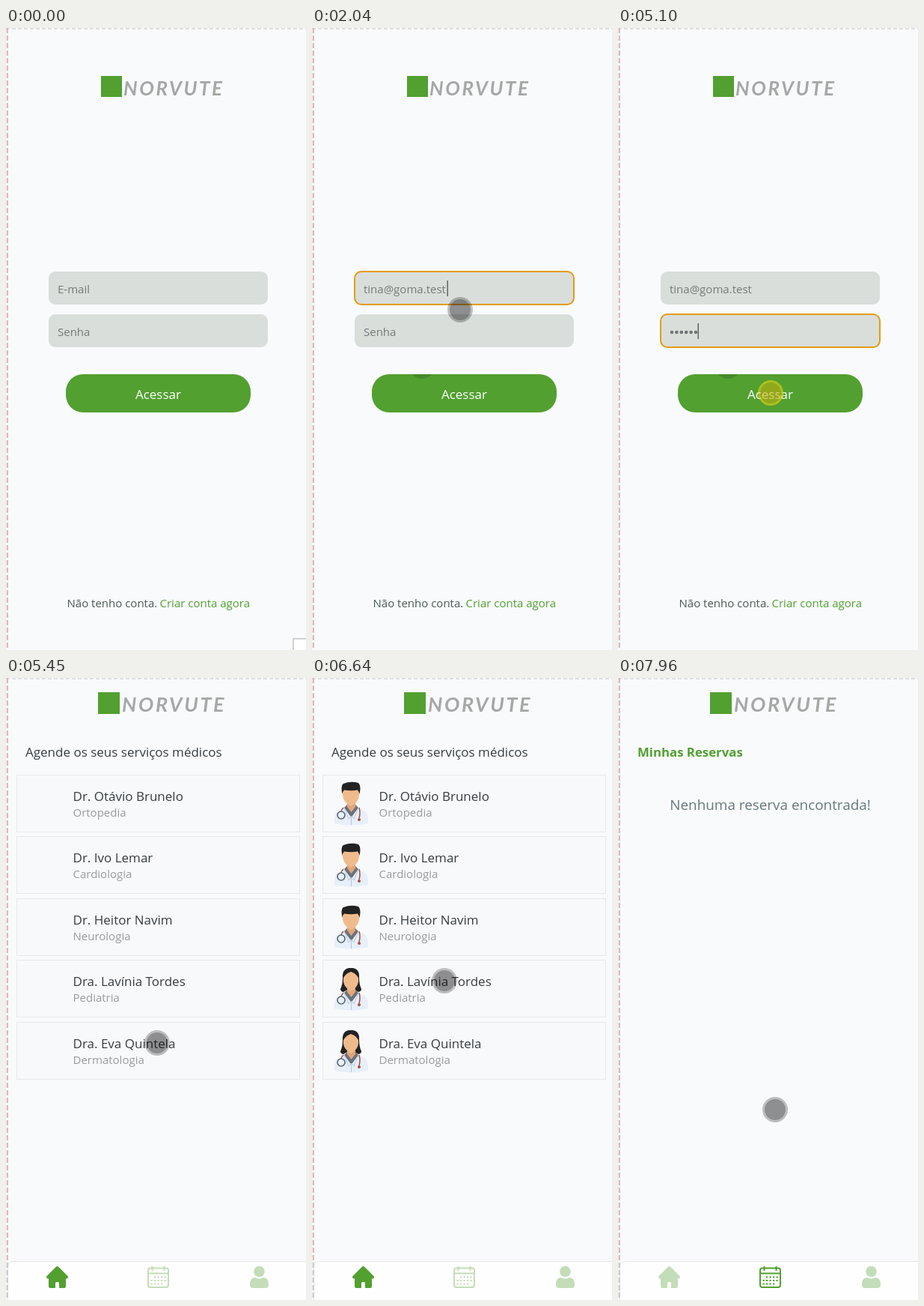
Animation, 401 px wide and 830 px high, one loop 8 s. Source, as an HTML page:

```html
<!DOCTYPE html>
<html lang="pt">
<head>
<meta charset="utf-8">
<title>Agendamento</title>
<style>
html, body { margin: 0; width: 100%; height: 100%; overflow: hidden; background: #f8fafc; }
svg { display: block; width: 401px; height: 830px; font: 15px "Open Sans", "Noto Sans", sans-serif; }
svg * { animation-duration: 8s; animation-iteration-count: infinite; animation-timing-function: step-end; }

.brand { font: italic 700 26px Lato, sans-serif; letter-spacing: 2.6px; fill: #a6a8a6; }
.green { fill: #52a030; }
.field { fill: #d9dedb; }
.hint { fill: #747b79; }
.ring { fill: none; stroke: #e39c0c; stroke-width: 2; }
.caret { fill: #5d6664; }
.big { font-size: 17px; fill: #363d41; }
.soft { fill: #989c9d; }
.card { fill: #f8f9fb; stroke: #e7e9eb; }
.mid { text-anchor: middle; }

/* screens */
.login { animation-name: login; }
.app { animation-name: app; }
.list { animation-name: list; }
.bookings { animation-name: bookings; }
.empty { animation-name: empty; }
.photo { animation-name: photo; }
.badge { animation-name: badge; }
@keyframes login { 0% { opacity: 1 } 68.125%, 100% { opacity: 0 } }
@keyframes app { 0% { opacity: 0 } 68.125%, 100% { opacity: 1 } }
@keyframes list { 0% { opacity: 1 } 93.25%, 100% { opacity: 0 } }
@keyframes bookings { 0% { opacity: 0 } 93.25%, 100% { opacity: 1 } }
@keyframes empty { 0% { opacity: 0 } 93.875%, 100% { opacity: 1 } }
@keyframes photo { 0% { opacity: 0 } 68.75%, 100% { opacity: 1 } }
@keyframes badge { 0% { opacity: 1 } .625%, 100% { opacity: 0 } }

/* form */
.ring1 { animation-name: ring1; }
.ring2 { animation-name: ring2; }
.hint1 { animation-name: hint1; }
.mail { animation-name: mail; }
.hint2 { animation-name: hint2; }
.caret1 { animation-name: caret1; }
.caret2 { animation-name: blink2; }
.typed { animation-name: type; }
.dots { animation-name: dots; stroke: #6e7573; stroke-width: 4.6; stroke-linecap: round; stroke-dasharray: 0 6.4; }
.smudge { animation-name: smudge; }
.button { animation-name: press-button; animation-timing-function: ease-out; }
@keyframes ring1 { 0% { opacity: 0 } 13.375% { opacity: 1 } 30.5%, 100% { opacity: 0 } }
@keyframes ring2 { 0% { opacity: 0 } 30.5% { opacity: 1 } 65.625%, 100% { opacity: 0 } }
@keyframes hint1 { 0% { opacity: 1 } 24.375%, 100% { opacity: 0 } }
@keyframes mail { 0% { opacity: 0 } 24.375%, 100% { opacity: 1 } }
@keyframes hint2 { 0% { opacity: 1 } 40.75%, 100% { opacity: 0 } }
@keyframes dots { 0% { opacity: 0 } 40.75%, 100% { opacity: 1 } }
@keyframes smudge { 0% { opacity: 0 } 8.75%, 100% { opacity: .13 } }
@keyframes caret1 {
  0% { opacity: 0; transform: none }
  13.375% { opacity: 1; transform: none }
  19.625% { opacity: 0; transform: none }
  24.375% { opacity: 1; transform: translateX(112px) }
  30.5%, 100% { opacity: 0; transform: none }
}
@keyframes blink2 {
  0% { opacity: 0 }
  30.5% { opacity: 1 } 37.375% { opacity: 0 }
  40.75% { opacity: 1 } 56% { opacity: 0 }
  62.25% { opacity: 1 } 65.625%, 100% { opacity: 0 }
}
@keyframes type {
  0% { transform: none }
  40.75% { transform: translateX(6px) }
  43.25% { transform: translateX(12.4px) }
  44.5% { transform: translateX(18.8px) }
  46.375% { transform: translateX(25.2px) }
  48.25% { transform: translateX(31.6px) }
  49.75%, 100% { transform: translateX(38px) }
}
@keyframes press-button { 0%, 64.4% { opacity: 1 } 66%, 66.6% { opacity: .7 } 68%, 100% { opacity: 1 } }

/* tab bar */
.tab-home { animation-name: tab-off; }
.tab-cal { animation-name: tab-on; }
.tab-user { color: #c3ddb8; }
.tab { fill: currentColor; }
@keyframes tab-off { 0% { color: #52a030 } 93.25%, 100% { color: #c3ddb8 } }
@keyframes tab-on { 0% { color: #c3ddb8 } 93.25%, 100% { color: #52a030 } }

/* pointer */
.pointer { animation-name: move; animation-timing-function: linear; }
.idle { animation-name: idle; }
.down { animation-name: down; }
@keyframes move {
  0%, 4.75% { transform: translate(182px, 850px) }
  8.5% { transform: translate(147px, 451px); animation-timing-function: ease-out }
  12.5%, 22.5% { transform: translate(128px, 336px) }
  25.5%, 26.2% { transform: translate(198px, 376px); animation-timing-function: ease-in-out }
  29.5% { transform: translate(157px, 405px) }
  57.5% { transform: translate(157px, 405px); animation-timing-function: ease-in-out }
  62.5%, 67.5% { transform: translate(204px, 487px) }
  68.125% { transform: translate(202px, 487px) }
  72% { transform: translate(202px, 487px); animation-timing-function: ease-in-out }
  77.5% { transform: translate(187px, 780px); animation-timing-function: ease-in }
  82.375% { transform: translate(177px, 473px) }
  83% { transform: translate(177px, 405px); animation-timing-function: ease-out }
  84.5% { transform: translate(175px, 335px); animation-timing-function: ease-in }
  88% { transform: translate(214px, 600px); animation-timing-function: ease-out }
  91% { transform: translate(209px, 813px) }
  97.75% { transform: translate(209px, 813px) }
  99.5%, 100% { transform: translate(210px, 576px) }
}
@keyframes idle {
  0% { opacity: 1 }
  13.375% { opacity: 0 } 15.875% { opacity: 1 }
  29.875% { opacity: 0 } 31.125% { opacity: 1 }
  63.125% { opacity: 0 } 65% { opacity: 1 }
  92% { opacity: 0 } 94.5%, 100% { opacity: 1 }
}
@keyframes down {
  0% { opacity: 0 }
  13.375% { opacity: 1 } 15.875% { opacity: 0 }
  29.875% { opacity: 1 } 31.125% { opacity: 0 }
  63.125% { opacity: 1 } 65% { opacity: 0 }
  92% { opacity: 1 } 94.5%, 100% { opacity: 0 }
}
</style>
</head>
<body>
<svg viewBox="0 0 401 830">
  <defs>
    <g id="coat">
      <path d="M30 64V58Q30 48 39 45L46 42H59L66 45Q75 48 75 58V64Q53 69 30 64Z" fill="#e7effa"/>
      <path d="M43 43L52.5 56L62 43L58 39H47Z" fill="#68727f"/>
      <path d="M47 34H58V42L52.5 49L47 42Z" fill="#e3a577"/>
      <path d="M43 43L49 58L52.5 54M62 43L56 58L52.5 54V66" fill="none" stroke="#b9c6d8"/>
      <path d="M42 43Q39 46 39 48M63 43Q65 50 63 57" fill="none" stroke="#a4503f" stroke-width="1.5"/>
      <circle cx="39" cy="53" r="5" fill="none" stroke="#59636f" stroke-width="1.6"/>
      <circle cx="63" cy="59" r="2" fill="#a4503f"/>
    </g>
    <g id="man">
      <use href="#coat"/>
      <path d="M41 20Q41 15 52 15Q63 15 63 20V27Q62 36 52 41Q42 36 41 27Z" fill="#f0bb8c"/>
      <path d="M40.500 25Q38 14 42 11Q52 7 62 10Q66 14 63.500 25Q62.500 21 61 19.500Q52 21 43 19.500Q41 21 40.500 25Z" fill="#232222"/>
    </g>
    <g id="woman">
      <path d="M41 23Q40 10 52 10Q64 10 63 23Q63 32 66 38Q66 41 62 42L52 36L42 42Q38 41 38 38Q41 32 41 23Z" fill="#232222"/>
      <use href="#coat"/>
      <path d="M42 22Q42 14 52 14Q62 14 62 22V28Q61 36 52 41Q43 36 42 28Z" fill="#f0bb8c"/>
      <path d="M41 26Q40 10 52 10Q64 10 63 26Q61 18 52 15Q43 18 41 26Z" fill="#232222"/>
    </g>
    <rect id="card" class="card" x="14.5" y="-.5" width="378" height="76"/>
  </defs>

  <g class="login">
    <rect class="green" x="127" y="64" width="28" height="28"/>
    <text class="brand" x="157" y="90">NORVUTE</text>

    <rect class="field" x="57" y="325" width="293" height="44" rx="9"/>
    <text class="hint hint1" x="69" y="354">E-mail</text>
    <text class="hint mail" x="69" y="354">tina@goma.test</text>
    <rect class="caret caret1" x="68.5" y="337" width="1.5" height="21"/>
    <rect class="ring ring1" x="57" y="325" width="293" height="44" rx="9"/>

    <rect class="field" x="57" y="382" width="293" height="44" rx="9"/>
    <path class="dots" d="M72 406H105"/>
    <g class="typed">
      <rect class="field" x="69" y="394" width="45" height="21"/>
      <rect class="caret caret2" x="68.5" y="394" width="1.5" height="21"/>
    </g>
    <text class="hint hint2" x="69" y="411">Senha</text>
    <rect class="ring ring2" x="57" y="382" width="293" height="44" rx="9"/>

    <g class="button">
      <rect class="green" x="80" y="462" width="247" height="51" rx="23"/>
      <path class="smudge" d="M133 462H161Q147 474 133 462Z"/>
      <text class="mid" x="203.5" y="495" font-size="17" fill="#fff">Acessar</text>
    </g>

    <text x="81.5" y="773" fill="#4c5a52">Não tenho conta.</text>
    <text class="green" x="205.5" y="773">Criar conta agora</text>
    <rect class="badge" x="384" y="815" width="30" height="30" fill="#fff" stroke="#cfd2d4" stroke-width="2"/>
  </g>

  <g class="app">
    <rect class="green" x="123" y="19" width="29" height="29"/>
    <text class="brand" x="155" y="45" style="font-size: 27px">NORVUTE</text>

    <g class="list">
      <text class="big" x="26" y="105">Agende os seus serviços médicos</text>
      <g transform="translate(0 130)">
        <use href="#card"/><use class="photo" href="#man"/>
        <text class="big" x="89.5" y="34">Dr. Otávio Brunelo</text><text class="soft" x="89.5" y="55">Ortopedia</text>
      </g>
      <g transform="translate(0 212)">
        <use href="#card"/><use class="photo" href="#man"/>
        <text class="big" x="89.5" y="34">Dr. Ivo Lemar</text><text class="soft" x="89.5" y="55">Cardiologia</text>
      </g>
      <g transform="translate(0 295)">
        <use href="#card"/><use class="photo" href="#man"/>
        <text class="big" x="89.5" y="34">Dr. Heitor Navim</text><text class="soft" x="89.5" y="55">Neurologia</text>
      </g>
      <g transform="translate(0 377)">
        <use href="#card"/><use class="photo" href="#woman"/>
        <text class="big" x="89.5" y="34">Dra. Lavínia Tordes</text><text class="soft" x="89.5" y="55">Pediatria</text>
      </g>
      <g transform="translate(0 460)">
        <use href="#card"/><use class="photo" href="#woman"/>
        <text class="big" x="89.5" y="34">Dra. Eva Quintela</text><text class="soft" x="89.5" y="55">Dermatologia</text>
      </g>
    </g>

    <g class="bookings">
      <text class="green" x="26" y="105" font-size="16.8" font-weight="700">Minhas Reservas</text>
      <text class="mid empty" x="203.5" y="176" font-size="18.9" fill="#66787d">Nenhuma reserva encontrada!</text>
    </g>

    <rect x="2.5" y="778.5" width="410" height="70" rx="7" fill="#fefefe" stroke="#e3e6e5"/>
    <g class="tab-home">
      <path class="tab" d="M56 799.5L68.5 787L81 799.5H78V812H72V805H65V812H59V799.5Z" stroke="currentColor" stroke-width="4" stroke-linejoin="round"/>
      <path d="M66 814V807.5Q66 806 67.5 806H69.5Q71 806 71 807.5V814Z" fill="#fefefe"/>
    </g>
    <g class="tab-cal" fill="none" stroke="currentColor" stroke-width="2">
      <rect x="190" y="787.5" width="27" height="25.5" rx="3"/>
      <path d="M190 794.5H217M195.5 785V791M211.5 785V791"/>
      <path d="M198 799.5H215M193.5 804H215M193.5 808.5H211" stroke-width="2.2" stroke-dasharray="2.2 2.3"/>
    </g>
    <g class="tab-user">
      <circle class="tab" cx="338.5" cy="792" r="7.3"/>
      <path class="tab" d="M326 810Q326 800 333 800Q338.5 803 344 800Q351 800 351 810Q351 814 347 814H330Q326 814 326 810Z"/>
    </g>
  </g>

  <path d="M0 1H401" stroke="#d3d6d8" stroke-width="1.5" stroke-dasharray="5 3"/>
  <path d="M1.8 0V830" stroke="#dfb0b2" stroke-width="2" stroke-dasharray="7 3"/>
  <path class="app" d="M1.8 780V830" stroke="#c9cccd" stroke-width="2" stroke-dasharray="7 3"/>

  <g class="pointer">
    <g class="idle">
      <circle r="17" fill-opacity=".24"/>
      <circle r="14" fill-opacity=".25"/>
    </g>
    <g class="down">
      <circle r="17" fill="#ffe10f" fill-opacity=".5"/>
      <circle r="14" fill-opacity=".13"/>
    </g>
  </g>
</svg>
</body>
</html>
```
